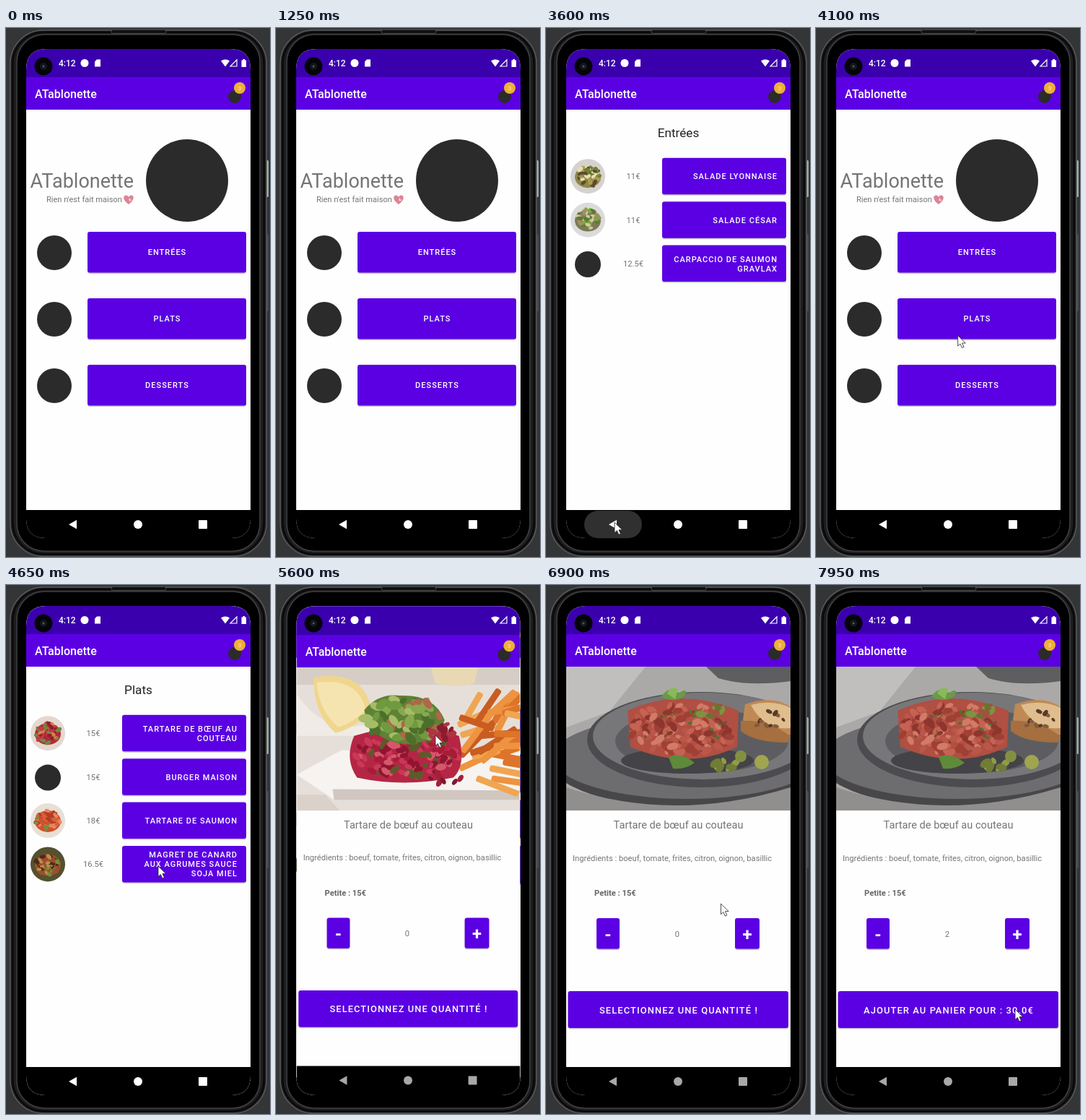
Animation, 366 px wide and 732 px high, one loop 8 s. Source, as an HTML page:

```html
<!DOCTYPE html>
<html lang="fr">
<head>
<meta charset="utf-8">
<style>
html, body { margin: 0; width: 100%; height: 100%; overflow: hidden; background: #2d2e30; }
svg { display: block; width: 100vw; height: 100vh; font-family: Roboto, sans-serif; }
</style>
</head>
<body>
<svg id="stage" viewBox="0 0 366 732"></svg>
<script>
const PURPLE = '#5b00e3', DARK = '#3a00ae', GREY = '#757575', POT = '#2b2b2b';
const BRAND = 'ATablonette';
const LOOP = 8000;

let seed = 7;
const rnd = (a = 0, b = 1) => {
  seed = (seed * 16807) % 2147483647;
  return a + (b - a) * seed / 2147483647;
};
const repeat = (n, f) => Array.from({ length: n }, (_, i) => f(i)).join('');

const rect = (x, y, w, h, fill, r = 0, extra = '') =>
  `<rect x="${x}" y="${y}" width="${w}" height="${h}" rx="${r}" fill="${fill}" ${extra}/>`;
const disc = (x, y, r, fill, extra = '') => `<circle cx="${x}" cy="${y}" r="${r}" fill="${fill}" ${extra}/>`;
const oval = (x, y, rx, ry, fill, extra = '') =>
  `<ellipse cx="${x}" cy="${y}" rx="${rx}" ry="${ry}" fill="${fill}" ${extra}/>`;
const path = (d, fill, extra = '') => `<path d="${d}" fill="${fill}" ${extra}/>`;
const text = (s, x, y, size, fill, anchor = 'start', extra = '') =>
  `<text x="${x}" y="${y}" font-size="${size}" fill="${fill}" text-anchor="${anchor}" ${extra}>${s}</text>`;
const caps = (s, x, y, size = 11, anchor = 'middle', id = '') =>
  text(s, x, y, size, '#fff', anchor, `${id} font-weight="500" letter-spacing="${size > 12 ? 1.1 : 1}"`);
const button = (x, y, w, h) =>
  rect(x, y + 1.5, w, h, '#000', 3, 'opacity=".22"') + rect(x, y, w, h, PURPLE, 3);

// Scatter of small tilted ovals inside an ellipse
const scatter = (n, x, y, rx, ry, size, colors) => repeat(n, i => {
  const a = rnd(0, 6.28), d = Math.sqrt(rnd());
  const px = x + rx * d * Math.cos(a), py = y + ry * d * Math.sin(a), s = rnd(.6, 1.2) * size;
  return oval(px.toFixed(1), py.toFixed(1), s.toFixed(1), (s * .6).toFixed(1), colors[i % colors.length],
    `transform="rotate(${rnd(-70, 70) | 0} ${px.toFixed(1)} ${py.toFixed(1)})"`);
});

function photoFries() {
  return rect(28, 113, 311, 199, '#e6dfd9') +
    rect(28, 113, 311, 24, '#d6cdc6') +
    path('M215 113h66l-6 22q-28 8-54 0z', '#e8d9b4') +
    path('M28 150q40 60 105 40v18H28z', '#f0ebe6') +
    path('M52 127q70-12 80 45q-20 24-50 32q-32-28-30-77z', '#f0d68d') +
    path('M56 134q58-8 68 38q-18 18-38 24q-28-24-30-62z', '#f5e4b0') +
    path('M28 262l62-34h249v64l-260 4z', '#f6f3f0') +
    path('M78 282l261 2v13H80z', '#d1c7c0') +
    path('M28 290h40l20 22H28z', '#d9d1ca') +
    repeat(30, i => {
      const x = rnd(250, 322), y = rnd(168, 266);
      return rect(x.toFixed(1), y.toFixed(1), rnd(38, 68).toFixed(1), 9,
        ['#dd7429', '#ee9340', '#c95c20', '#f0a552'][i % 4], 3,
        `transform="rotate(${rnd(-65, 25) | 0} ${x.toFixed(1)} ${y.toFixed(1)})"`);
    }) +
    path('M108 208q72-22 146 0q10 42-8 58q-70 14-134 0q-18-26-4-58z', '#b52645') +
    scatter(110, 180, 236, 72, 30, 7, ['#c93858', '#a71b39', '#d5576c', '#8f1530', '#5e5a2a']) +
    path('M122 172q20-24 50-20q48-2 62 34q-6 28-50 34q-54-4-62-48z', '#5f8136') +
    scatter(64, 177, 184, 54, 29, 9, ['#6f9a40', '#4c702c', '#a5bc69', '#87a94e', '#b0664a']) +
    scatter(12, 226, 203, 20, 14, 7, ['#8a1c2e', '#b03442']) +
    scatter(7, 238, 268, 30, 7, 6, ['#a3203a', '#7f1730']);
}

function photoPlate() {
  return rect(28, 113, 311, 199, '#aaa9a8') +
    path('M28 113h110l-50 62l-60 22z', '#c0bfbe') +
    path('M222 113h117v20q-60 8-100-4z', '#5e5e60') +
    oval(196, 244, 190, 64, '#47474a') +
    oval(196, 238, 186, 58, '#6d6d70') +
    oval(215, 214, 158, 66, '#4c4c50') +
    oval(218, 209, 153, 60, '#77777a') +
    oval(216, 216, 120, 44, '#5d5d61') +
    path('M28 280q150 50 311 0v32H28z', '#918f8d') +
    oval(196, 243, 92, 18, '#444347') +
    path('M113 174q74-34 154 0l-2 50q-70 34-148 0z', '#b04f42') +
    scatter(130, 190, 200, 72, 36, 7, ['#c66253', '#a04034', '#d17b68', '#8e362e', '#b9574a']) +
    scatter(18, 190, 204, 66, 30, 3, ['#55722e', '#74523a']) +
    path('M276 165q40-14 63 4v38q-40 10-66-20z', '#bf8955') +
    path('M284 166q30-8 55 4v28q-36 4-55-32z', '#dfbd8d') +
    path('M270 188q40-2 69 22l-4 8q-46 0-65-16z', '#a56f40') +
    scatter(10, 308, 186, 22, 14, 4, ['#56392a', '#85593a']) +
    path('M160 154q12-16 24-4q14-10 8 4q-16 10-32 0z', '#6b9a44') +
    path('M168 150q6-12 15-6l-4 14z', '#8ab95d') +
    scatter(9, 228, 174, 18, 8, 7, ['#7f9242', '#64762f', '#9b5541']) +
    path('M170 238q16-8 36 8q-14 10-30 8z', '#5f8a3a') +
    scatter(8, 246, 247, 22, 10, 8, ['#8f9c48', '#707d34']) +
    disc(299, 245, 10, '#a0a550') + disc(270, 237, 8, '#858f42');
}

// Round dish: plate colour plus a scatter of food
const dish = (cy, plate, base, colors) =>
  disc(58, cy, 24, plate) + oval(58, cy + 1, 18, 15, base) + scatter(44, 58, cy, 17, 14, 4, colors);

function win(id, body, nav = '#fff') {
  return `<g id="${id}">` + rect(28, 28, 311, 680, '#fefefe') +
    rect(28, 28, 311, 40.5, DARK) + rect(28, 68, 311, 45, PURPLE) +
    text(BRAND, 40, 97, 16, '#fff', 'start', 'font-weight="500"') +
    disc(317, 95, 9, POT) + disc(324, 83, 8, '#efb034') +
    text('3', 324, 86, 8, '#fff3d0', 'middle') +
    body + rect(28, 667, 311, 42, '#000') +
    (id === 'starters' ? rect(53, 668, 80, 38, '#303030', 19, 'id="ripple"') : '') +
    path('M87 687l11-6.2v12.4z', nav) + disc(183, 687, 6, nav) + rect(267, 681, 12, 12, nav, 1) + '</g>';
}

const home = () =>
  text(BRAND, 177, 221, 27, GREY, 'end') +
  text("Rien n'est fait maison", 161, 241, 11.1, GREY, 'end') +
  path('M170 244c-9-6-8-13-3-12.500q2 0 3 2.500q1-2.500 3-2.500c5-.5 6 6.500-3 12.500z', '#dd8497') +
  path('M170 238l1.500-3 1 2.500 2 .5-2.500 1.500z', '#f7dbe0') +
  disc(251, 211, 57, POT) +
  ['ENTRÉES', 'PLATS', 'DESSERTS'].map((s, i) =>
    disc(67, 311 + 92 * i, 24, POT) + button(113, 282 + 92 * i, 220, 56.500) +
    caps(s, 223.500, 314 + 92 * i)).join('');

const list = (title, items) => text(title, 183.500, 151, 17.2, '#222', 'middle') +
  items.map(([price, lines, photo, id], i) => {
    const cy = 205.2 + 60.4 * i;
    return disc(58, cy + 1, 18, POT, id ? `id="${id}pot"` : '') +
      (photo ? `<g id="${id}">${dish(cy, ...photo)}</g>` : '') +
      text(price, 121, cy + 4, 11.2, GREY, 'middle') + button(161, cy - 25.4, 172, 50.500) +
      lines.map((s, k) => caps(s, 321, cy + 4 + 13 * (k - (lines.length - 1) / 2), 11, 'end')).join('');
  }).join('');

const detail = () =>
  `<g clip-path="url(#photo)"><g id="slides"><g id="slide1">${photoFries()}</g>
   <g transform="translate(311 0)">${rect(28, 113, 311, 199, '#fefefe')}${disc(183, 212, 90, POT)}
   <g id="slide2">${photoPlate()}</g></g></g></g>` +
  text('Tartare de bœuf au couteau', 183.500, 337, 14.6, GREY, 'middle') +
  text('Ingrédients : boeuf, tomate, frites, citron, oignon, basillic', 37, 381.500, 11.2, GREY) +
  text('Petite : 15€', 67, 430, 11.2, '#666', 'start', 'font-weight="700"') +
  button(70, 461, 32, 42.500) + text('-', 86, 492, 24, '#fff', 'middle', 'font-weight="700"') +
  button(262, 461, 34, 42.500) + text('+', 279, 492, 24, '#fff', 'middle', 'font-weight="700"') +
  text('0', 182, 487, 11.2, GREY, 'middle', 'id="count"') +
  button(30.500, 562, 305.500, 51) + caps('', 184, 592.500, 12.9, 'middle', 'id="order"');

const STARTERS = [
  ['11€', ['SALADE LYONNAISE'], ['#d5d2cf', '#8c8a4a', ['#6d7f35', '#b09a55', '#e8ddb0', '#5b4a2c']], 'salad'],
  ['11€', ['SALADE CÉSAR'], ['#dadbda', '#7a7a55', ['#7da63f', '#a88a68', '#5c7a30', '#d3c6a8']], 'caesar'],
  ['12.5€', ['CARPACCIO DE SAUMON', 'GRAVLAX']]
];
const MAINS = [
  ['15€', ['TARTARE DE BŒUF AU', 'COUTEAU'], ['#e4d8d0', '#b3283c', ['#c23a48', '#8f1c30', '#d98040', '#6f8a3c']], 'beef'],
  ['15€', ['BURGER MAISON']],
  ['18€', ['TARTARE DE SAUMON'], ['#e8dfd6', '#d0502e', ['#d9603a', '#b83a24', '#e58a5a', '#7d8a40']], 'salmon'],
  ['16.5€', ['MAGRET DE CANARD', 'AUX AGRUMES SAUCE', 'SOJA MIEL'], ['#55502f', '#8a5a2c', ['#c98a4a', '#4a2a1c', '#a8482c', '#7a8a3a']], 'duck']
];

const phone = rect(0, 0, 366, 732, '#343537') +
  rect(360, 183, 4, 51, '#9fb3a2', 1.500) + rect(360, 285, 4, 107, '#4a4b4d', 1.500) +
  rect(6, 3, 355, 728, '#161617', 46, 'stroke="#5a5b5d" stroke-width="1.500"') +
  rect(9.500, 6, 348, 722, '#1e1e20', 43, 'stroke="#08080a" stroke-width="2"') +
  rect(15, 9, 337, 715, '#000', 38, 'stroke="#3f4042" stroke-width="1.500"') +
  rect(146, 2.500, 76, 5, '#101011', 2.500, 'stroke="#55565a" stroke-width=".8"');

const status = disc(52, 53, 12.500, '#050508') + disc(52, 53, 5, '#14161c') + disc(52, 53, 1.500, '#4a5568') +
  text('4:12', 73, 53, 12, '#fff', 'start', 'font-weight="500"') +
  disc(109, 48.500, 5.500, '#fff') +
  path('M126 43.500h5v10h-8v-7z', '#fff') +
  path('M298 45.500q6-4 12 0l-6 8z', '#fff') +
  path('M320 44v9h-9z', 'none', 'stroke="#fff" stroke-width="1.200"') +
  path('M326.500 44.500h2v-1.500h2.500v1.500h2v9.500h-6.500z', '#fff');

const stage = document.getElementById('stage');
stage.innerHTML = `<defs>
  <clipPath id="screen"><path d="M28 57q0-28 28-28h255q28 0 28 28v622q0 27-27 27H55q-27 0-27-27z"/></clipPath>
  <clipPath id="photo"><rect x="28" y="113" width="311" height="199"/></clipPath></defs>` +
  phone + '<g clip-path="url(#screen)">' + win('home', home()) + win('starters', list('Entrées', STARTERS)) +
  win('mains', list('Plats', MAINS)) + win('detail', detail(), '#a8a8a8') + '</g>' + status +
  path('M0 0v14.500l3.400-3.100 2.400 5.600 2.600-1.100-2.400-5.400h4.700z', '#fff',
    'id="cursor" stroke="#222" stroke-width=".8"');

const el = {};
stage.querySelectorAll('[id]').forEach(n => el[n.id] = n);

const clamp = (t, a, b) => Math.min(1, Math.max(0, (t - a) / (b - a)));
const smooth = p => p * p * (3 - 2 * p);
// Fast start, very long settle
const settle = p => p < 1 / 6 ? .4 * (p * 6) ** 2.2 : 1 - .6 * (1 - (p - 1 / 6) * 1.2) ** 12;
const fade = (id, v) => el[id].setAttribute('opacity', v.toFixed(3));

const MOVES = [
  [2230, 'home', 'starters', true], [3690, 'starters', 'home', false],
  [4390, 'home', 'mains', true], [5462, 'mains', 'detail', true]
];
const POINTER = [
  [1350, 352, 470], [1950, 197, 315], [2550, 197, 315], [3300, 95, 684], [3750, 95, 684],
  [4200, 211, 389], [4750, 211, 389], [5250, 221, 208], [5950, 221, 208], [6350, 74, 240],
  [6450, 52, 243], [6600, 52, 243], [7000, 277, 477], [7480, 277, 477], [7820, 276, 587], [8000, 276, 587]
];
// Image loads: node id, start, end
const LOADS = [['salad', 2240, 2400], ['caesar', 2400, 2580], ['beef', 4450, 4580],
  ['salmon', 4480, 4640], ['duck', 4460, 4600], ['slide1', 5460, 5580], ['slide2', 6150, 6420]];

function pose(id, scale, alpha) {
  el[id].style.display = '';
  el[id].setAttribute('transform', `translate(183.500 367) scale(${scale.toFixed(4)}) translate(-183.500 -367)`);
  fade(id, alpha);
}

function windows(t) {
  ['home', 'starters', 'mains', 'detail'].forEach(id => el[id].style.display = 'none');
  const move = MOVES.filter(m => m[0] <= t).pop();
  if (!move) return pose('home', 1, 1);
  const [start, from, to, opening] = move, dt = t - start;
  const e = settle(clamp(dt, 0, 400)), a = clamp(dt, 20, 100);
  if (dt < 400) pose(from, opening ? 1 + .05 * e : 1 - .1 * e, opening ? 1 : 1 - a);
  pose(to, opening ? .85 + .15 * e : 1.05 - .05 * e, opening ? a : 1);
}

function pointer(t) {
  const i = POINTER.findIndex(k => k[0] > t);
  el.cursor.style.display = i > 0 ? '' : 'none';
  if (i < 1) return [0, 0];
  const [t0, x0, y0] = POINTER[i - 1], [t1, x1, y1] = POINTER[i], p = smooth(clamp(t, t0, t1));
  return [x0 + (x1 - x0) * p, y0 + (y1 - y0) * p];
}

function draw(t) {
  windows(t);
  const [x, y] = pointer(t);
  el.cursor.setAttribute('transform', `translate(${x.toFixed(2)} ${y.toFixed(2)})`);

  LOADS.forEach(([id, a, b]) => {
    const p = clamp(t, a, b);
    fade(id, p);
    if (el[id + 'pot']) fade(id + 'pot', 1 - p);
  });
  fade('ripple', clamp(t, 3500, 3580) * (1 - clamp(t, 3680, 3900)));

  // The strip follows the pointer after a short slop, then snaps to the next photo
  const drag = t < 5950 ? 0 : Math.max(0, 221 - (t < 6450 ? x : 52) - 17);
  const snap = 1 - (1 - clamp(t, 6450, 6750)) ** 3;
  el.slides.setAttribute('transform', `translate(${(-drag - (311 - drag) * snap).toFixed(2)} 0)`);

  const n = (t >= 7150) + (t >= 7400);
  el.count.textContent = n;
  el.order.textContent = n ? `AJOUTER AU PANIER POUR : ${15 * n}.0€` : 'SELECTIONNEZ UNE QUANTITÉ !';
}

const begin = performance.now();
function tick() {
  draw((performance.now() - begin) % LOOP);
  requestAnimationFrame(tick);
}
tick();
</script>
</body>
</html>
```
